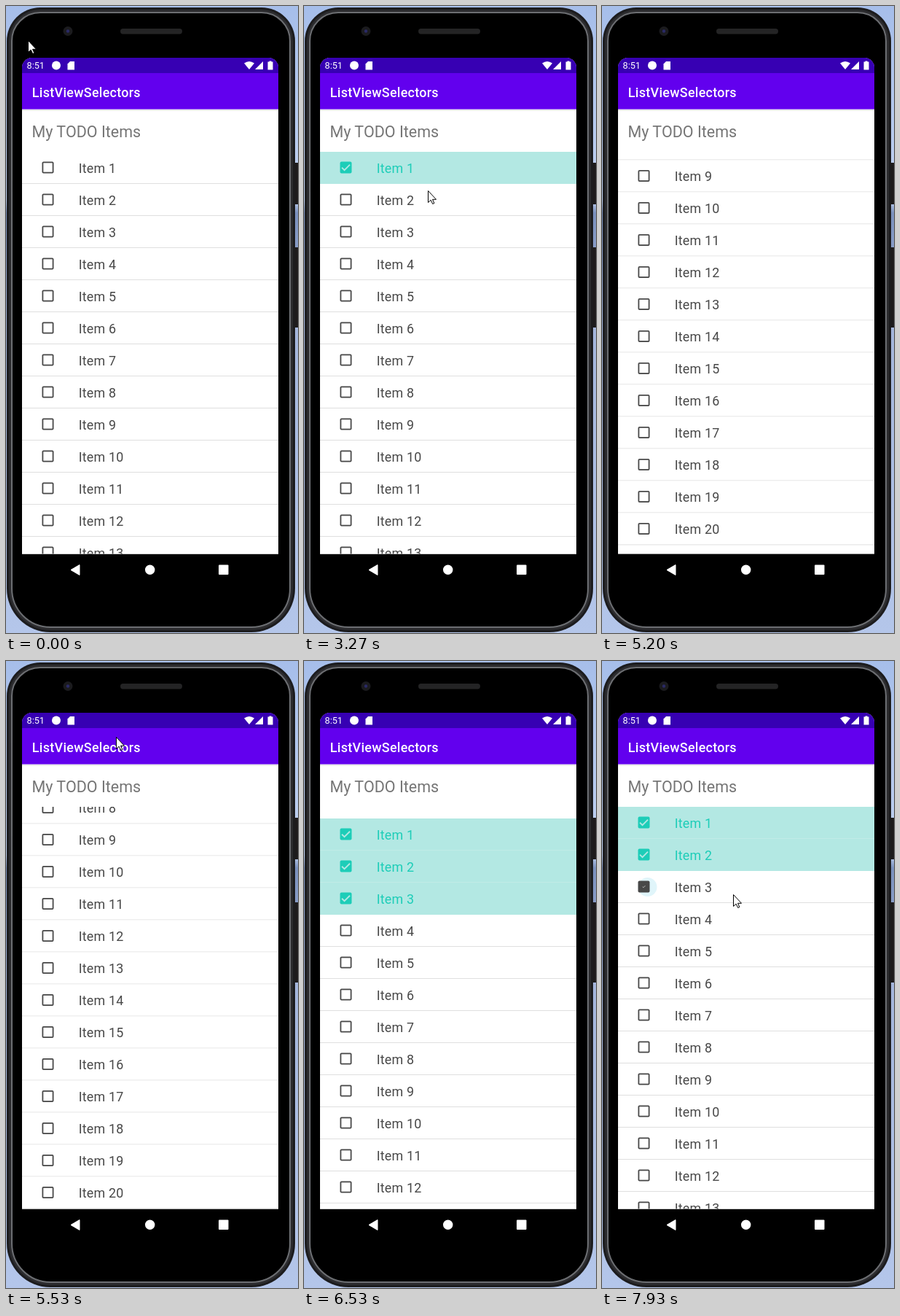
An HTML page for the animation above (8 s loop, 401 px wide and 860 px high).

```html
<!DOCTYPE html>
<html lang="en">
<head>
<meta charset="utf-8">
<title>ListViewSelectors</title>
<style>
html, body { margin: 0; width: 100%; height: 100%; overflow: hidden; background: #a9bfe2; }
svg { display: block; width: 401px; height: 860px; font-family: Roboto, sans-serif; }
</style>
</head>
<body>
<svg viewBox="0 0 401 860">
  <defs>
    <linearGradient id="sky" x2="0" y2="1">
      <stop offset="0" stop-color="#a6beea"/>
      <stop offset=".31" stop-color="#c0d1f0"/>
      <stop offset=".33" stop-color="#7a90bd"/>
      <stop offset=".5" stop-color="#a3b5db"/>
      <stop offset="1" stop-color="#b4c6ea"/>
    </linearGradient>
    <clipPath id="screen"><rect x="22" y="71" width="352" height="720" rx="14"/></clipPath>
    <clipPath id="view"><rect x="22" y="200" width="352" height="551.6"/></clipPath>
  </defs>

  <rect width="401" height="860" fill="url(#sky)"/>
  <path d="M396 215h5v57h-5zM396 331h5v110h-5z" fill="#1d1b1c"/>
  <g id="shell"></g>
  <rect x="157" y="31" width="85" height="7.5" rx="3.7" fill="#242425"/>
  <circle cx="85" cy="34.5" r="6.5" fill="#1b1b1e"/>
  <circle cx="85" cy="34.5" r="2.2" fill="#2a2a66"/>

  <g clip-path="url(#screen)">
    <rect x="22" y="71" width="352" height="680.6" fill="#fff"/>
    <rect x="22" y="71" width="352" height="70.6" fill="#6200ee"/>
    <rect x="22" y="71" width="352" height="21" fill="#3700b3"/>
    <rect x="22" y="142" width="352" height="1.5" opacity=".1"/>
  </g>
  <g fill="#fff">
    <text x="28.5" y="86" font-size="12.7">8:51</text>
    <circle cx="69" cy="81.5" r="6"/>
    <path d="M88 76h6v11.5h-9.5v-8z"/>
    <path d="M327 78.5q7-5 14 0l-7 8.5z"/>
    <path d="M353 76v11h-11z"/>
    <path d="M359.500 76.500h2v-1h3v1h2v11h-7z"/>
    <text x="35.800" y="124.500" font-size="17.920" font-weight="500" letter-spacing=".3">ListViewSelectors</text>
    <path d="M89 773.500l12-7v14z" stroke="#fff" stroke-linejoin="round"/>
    <circle cx="197.700" cy="773.300" r="6.700"/>
    <rect x="292" y="766.500" width="13.500" height="13.500" rx="1"/>
  </g>
  <text x="35.500" y="180" font-size="21.500" fill="#757575">My TODO Items</text>

  <g clip-path="url(#view)"><g id="list"></g></g>
  <path id="cursor" d="M.5 .5V16.500L4.200 13.200L6.700 18.500L8.900 17.500L6.500 12.300H11.500z" fill="#fff" stroke="#000"/>
</svg>
<script>
const STEPS = 120, STEP = 8000 / STEPS;
const ROWS = 20, ROW_H = 44, MAX_SCROLL = 328.5, RUBBER = .065;
const TEAL = '#1dcdb8', ROW_TEAL = '#b3e8e3';
const $ = id => document.getElementById(id);
const clamp = (v, lo = 0, hi = 1) => Math.min(hi, Math.max(lo, v));

function set(el, attrs) {
  for (const name in attrs) el.setAttribute(name, attrs[name]);
}
function add(parent, tag, attrs, text) {
  const el = document.createElementNS('http://www.w3.org/2000/svg', tag);
  set(el, attrs);
  if (text) el.textContent = text;
  return parent.appendChild(el);
}

// Phone body: nested outlines from the rim to the glass
function outline(d) {
  const a = 46 - d, b = 60 - d, left = 1 + d, right = 397 - d, top = 2 + d, bottom = 859 - d;
  return `M${left} ${top + a}a${a} ${a} 0 0 1 ${a} ${-a}H${right - a}a${a} ${a} 0 0 1 ${a} ${a}` +
    `V${bottom - b}a${b} ${b} 0 0 1 ${-b} ${b}H${left + b}a${b} ${b} 0 0 1 ${-b} ${-b}z`;
}
add($('shell'), 'path', { d: outline(0), fill: '#1c1c1e' });
add($('shell'), 'path', { d: outline(3), fill: '#2c2c2f' });
add($('shell'), 'path', { d: outline(7), fill: '#000', stroke: '#6c6e72', 'stroke-width': 2 });

const rows = Array.from({ length: ROWS }, (_, i) => {
  const g = add($('list'), 'g', { transform: `translate(22 ${200 + i * ROW_H})` });
  const row = {
    back: add(g, 'rect', { width: 352, height: ROW_H }),
    line: add(g, 'rect', { y: 43, width: 352, height: 1 }),
    ripple: add(g, 'circle', { cx: 40.5, cy: 22 }),
    label: add(g, 'text', { x: 77.8, y: 28.5, 'font-size': 17.92, 'letter-spacing': .15 }, 'Item ' + (i + 1))
  };
  const box = add(g, 'g', { transform: 'translate(35.5 21.5)' });
  row.box = add(box, 'rect', { x: -8, y: -8, width: 16, height: 16, rx: 2 });
  row.hole = add(box, 'rect', {});
  row.mark = add(box, 'path', { d: 'M-5.5 .2L-2 3.7L5.5 -3.8', fill: 'none', 'stroke-width': 1.9 });
  return row;
});

// All times are in steps. Clicks per row: first checks, second unchecks
const clicks = [[43.5], [54.6], [62.5, 117.5]];

// Pointer moves: start, end, x, y; it rests in between
const moves = [
  [3, 4, 30, 56], [7, 13, 190, 286], [15, 16, 190, 273], [18, 23, 214, 364], [25, 28, 205, 397],
  [28, 31, 168, 320], [31, 40, 167, 233], [47, 52, 174, 282], [56, 61, 181, 318],
  [65, 67, 150, 485], [68, 77, 162, -29], [80, 90, 126, 413], [94, 98, 140, 988],
  [103, 106, 158, 402], [106, 109, 216, 306], [111, 115, 180, 327], [117, 118, 180, 320]
];
// Press and release of each drag
const drags = [[68, 80], [94, 102]];

function pointer(t) {
  let x = 30, y = 47;
  for (const [start, end, toX, toY] of moves) {
    const p = clamp((t - start) / (end - start));
    x += (toX - x) * p;
    y += (toY - y) * p;
  }
  return { x, y };
}

// The list follows the finger, stretches past its ends and springs back
function scroll(t) {
  let pos = 0;
  for (const [press, release] of drags) {
    if (t < press) break;
    const raw = pos + pointer(press).y - pointer(Math.min(t, release)).y;
    const rest = clamp(raw, 0, MAX_SCROLL);
    pos = rest + (raw - rest) * RUBBER * (1 - clamp((t - release) / 3));
  }
  return pos;
}

const past = (i, t) => (clicks[i] || []).filter(c => c <= t);
const isOn = (i, t) => past(i, t).length % 2 === 1;

function drawRow(row, i, t) {
  const on = isOn(i, t), age = t - Math.max(-99, ...past(i, t));
  const turn = clamp(age / 4.5), p = on ? turn : 1 - turn;
  const back = on ? ROW_TEAL : '#fff', ink = on ? TEAL : '#484848';
  const hole = 12.4 * clamp(1 - 2 * p);
  set(row.back, { fill: back });
  set(row.line, { fill: on ? (isOn(i + 1, t) ? '#c1ebe7' : ROW_TEAL) : '#dfdfdf' });
  set(row.label, { fill: ink });
  set(row.box, { fill: ink });
  set(row.hole, { x: -hole / 2, y: -hole / 2, width: hole, height: hole, fill: back });
  set(row.mark, { stroke: back, transform: `scale(${clamp(2 * p - 1)})` });
  set(row.ripple, {
    r: 8 + 5 * clamp(age),
    fill: on ? '#000' : '#03a9d4',
    opacity: .12 * clamp((5.4 - age) / 2.4)
  });
}

function draw(now) {
  const t = Math.floor((now + 4) / STEP) % STEPS;
  const { x, y } = pointer(t);
  set($('cursor'), { transform: `translate(${Math.round(x)} ${Math.round(y)})` });
  set($('list'), { transform: `translate(0 ${-scroll(t)})` });
  rows.forEach((row, i) => drawRow(row, i, t));
  requestAnimationFrame(draw);
}
draw(0);
</script>
</body>
</html>
```
